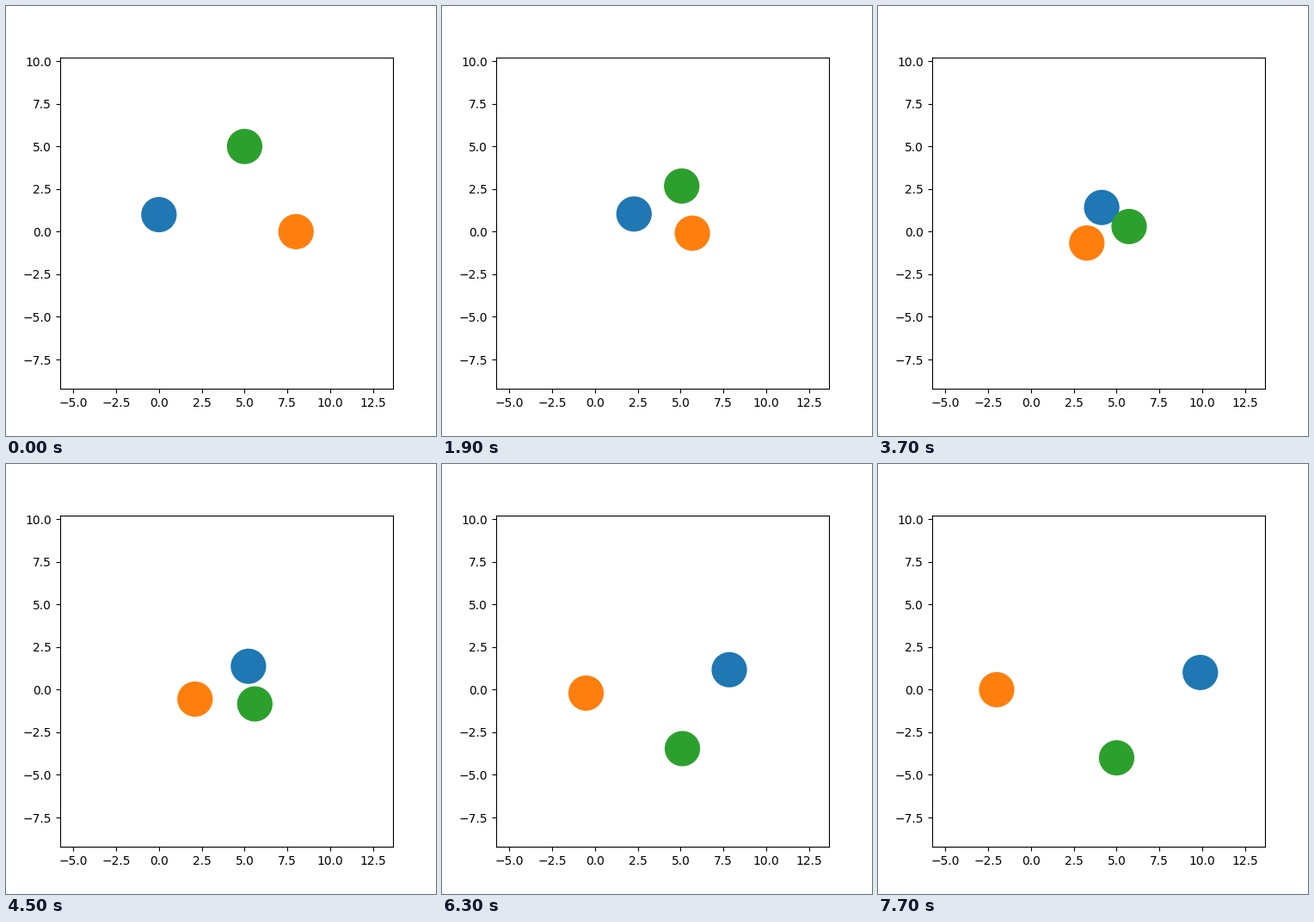
Animation, 500 px wide and 500 px high, one loop 7.9 s. Source, as a matplotlib script:

```python
import math

import matplotlib.pyplot as plt
from matplotlib.animation import FuncAnimation
from matplotlib.patches import Circle

TICK = 100      # ms per animation frame
FRAMES = 79     # 7.9 s loop
HOLD = 5        # frames spent on the starting pose
PER_STEP = 2    # frames per motion step
SPEED = 0.292   # cruise distance per step
SOFTNESS = 1.8  # steps over which an encounter unfolds


class Mover:
    """A disc that heads for its goal and sidesteps the others on its left."""

    def __init__(self, ax, color, start, goal, meet, lag, side):
        self.start, self.goal = start, goal
        self.meet, self.lag, self.side = meet, lag, side
        self.disc = ax.add_patch(Circle((start.real, start.imag), 1, color=color))

    def place(self, step):
        route = self.goal - self.start
        length = abs(route)
        heading = route / length
        met = 1 / (1 + math.exp((self.meet - step) / SOFTNESS))
        # The encounter costs some distance; the sidestep fades towards the goal.
        dist = min(max(SPEED * step - self.lag * met, 0), length)
        offset = self.side * met * (1 - dist / length) if step else 0
        pos = self.start + heading * (dist + 1j * offset)
        self.disc.center = pos.real, pos.imag


fig, ax = plt.subplots(figsize=(5, 5), dpi=100)
ax.set_xlim(-5.79, 13.66)
ax.set_ylim(-9.215, 10.215)

movers = [
    Mover(ax, "tab:blue", 0 + 1j, 10 + 1j, meet=12.9, lag=0.92, side=0.79),
    Mover(ax, "tab:orange", 8 + 0j, -2 + 0j, meet=12.3, lag=0.24, side=1.36),
    Mover(ax, "tab:green", 5 + 5j, 5 - 4j, meet=13.3, lag=0.30, side=1.72),
]


def draw(i):
    step = 0 if i < HOLD else (i - HOLD) // PER_STEP + 1
    for mover in movers:
        mover.place(step)
    return [mover.disc for mover in movers]


anim = FuncAnimation(fig, draw, frames=FRAMES, interval=TICK,
                     repeat=True, repeat_delay=0)
plt.show()
```
